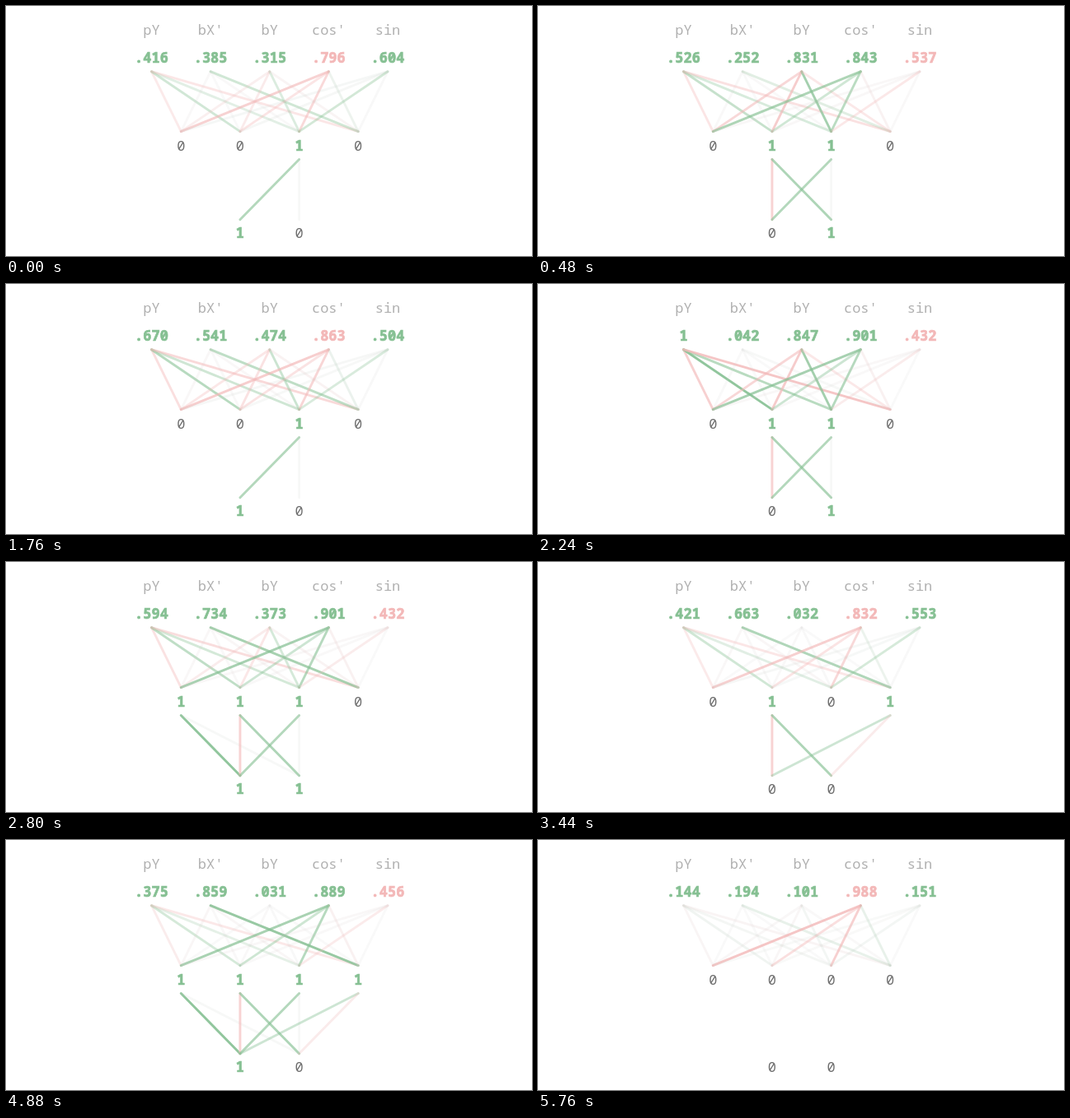
An HTML page that plays this animation: 638x304 px, repeating every 5.92 s.

```html
<!DOCTYPE html>
<html lang="en">
<head>
<meta charset="utf-8">
<title>Network activity</title>
<style>
  html, body { margin: 0; width: 100%; height: 100%; overflow: hidden; background: #fff; }
  svg { display: block; width: 638px; height: 304px; }
  text { font: 17px "Noto Sans Mono", monospace; text-anchor: middle; fill: #b0b0b0; }
  text.strong { font-weight: 700; stroke-width: .7; }
  line { stroke-width: 2.9; stroke-linecap: round; }
</style>
</head>
<body>
<svg id="stage" viewBox="0 0 638 304"></svg>
<script>
const LOOP = 5920, TICK = 80;
const GREEN = [134, 192, 147], PINK = [243, 184, 184], GRAY = [205, 203, 203], DARK = [108, 108, 108];

// Ticks on which the game pauses for one tick.
const RESTS = [8, 13, 18, 36, 40, 44, 49, 54, 60, 62, 68, 73];

// The ball crosses the court between bounces; each bounce gives a new |sin|.
const FLIGHTS = [
  { from: -5.114, sin: .6048 }, { from: 3.208, sin: .5375 }, { from: 14.284, sin: .5045 },
  { from: 24.57, sin: .4325 }, { from: 34.688, sin: .5538 }, { from: 44.53, sin: .4565 },
  { from: 53.221, sin: .1515 }, { from: 62.878, sin: 0 }
];
// Height of the ball with its wall bounces unfolded, as [step, distance].
const CLIMB = [[0, .315], [11, 1.879], [19, 2.474], [25, 3.153], [38, 4.032], [52, 5.969], [61, 6.101]];
const PADDLE = [[0, .416], [4, .645], [11, .231], [25, 1], [35, .421], [38, .421], [45, .81], [52, .375], [61, .144]];

// Rows are the inputs pY, bX', bY, cos', sin; columns the hidden units.
const INNER = {
  weights: [
    [-.75, 1, .65, -.9],
    [-.1, -.05, -.12, 1.1],
    [-.75, -.95, 1, -.4],
    [.9, .5, .75, -.22],
    [.12, .1, .65, .05]
  ],
  thresholds: [-.08, -.17, .15, .34]
};
const OUTER = {
  weights: [[1, .04], [-.7, .75], [.7, .04], [.45, -.3]],
  thresholds: [.4, .65]
};

const stage = document.getElementById("stage");
const spread = (count, offset) => Array.from({ length: count }, (_, i) => 176.5 + 71.63 * (i + offset));
const X_IN = spread(5, 0), X_HID = spread(4, .5), X_OUT = spread(2, 1.5);

function add(tag, attrs) {
  const node = document.createElementNS("http://www.w3.org/2000/svg", tag);
  for (const key in attrs) node.setAttribute(key, attrs[key]);
  return stage.appendChild(node);
}
const mesh = (from, to, y1, y2) =>
  from.map(x1 => to.map(x2 => add("line", { x1, y1, x2, y2 })));
const row = (xs, y) => xs.map(x => add("text", { x, y }));

const linesIn = mesh(X_IN, X_HID, 79.7, 152.6);
const linesOut = mesh(X_HID, X_OUT, 186.5, 259.7);
row(X_IN, 35).forEach((node, i) => node.textContent = ["pY", "bX'", "bY", "cos'", "sin"][i]);
const values = row(X_IN, 68.7);
const hiddenTexts = row(X_HID, 175.7);
const outTexts = row(X_OUT, 282.3);

function along(knots, s) {
  const i = Math.max(1, knots.findIndex(k => k[0] >= s));
  const [s0, v0] = knots[i - 1], [s1, v1] = knots[i];
  return v0 + (v1 - v0) * (s - s0) / (s1 - s0);
}

function readInputs(step) {
  const next = FLIGHTS.findIndex(f => f.from > step);
  const { from, sin } = FLIGHTS[next - 1];
  const part = (step - from) / (FLIGHTS[next].from - from);
  const leftward = next % 2 === 1;
  const climb = along(CLIMB, step);
  const rising = Math.floor(climb) % 2 === 0;
  const cos = Math.sqrt(1 - sin * sin);
  return [
    along(PADDLE, step),
    leftward ? 1 - part : part,
    rising ? climb % 1 : 1 - climb % 1,
    leftward ? -cos : cos,
    rising ? sin : -sin
  ];
}

const fire = ({ weights, thresholds }, signals) => thresholds.map((limit, j) =>
  +(signals.reduce((sum, v, i) => sum + v * weights[i][j], 0) > limit));

function format(v) {
  const n = Math.floor(Math.abs(v) * 1000 + 1e-4);
  return n >= 1000 ? "1" : "." + String(n).padStart(3, "0");
}

const rgb = c => `rgb(${c.map(Math.round)})`;

function write(node, text, color, strong) {
  node.textContent = text;
  node.style.fill = rgb(color);
  node.style.stroke = strong ? rgb(color) : "none";
  node.classList.toggle("strong", strong);
}
const writeBits = (nodes, bits) =>
  nodes.forEach((node, i) => write(node, bits[i], bits[i] ? GREEN : DARK, bits[i] === 1));

function paint(line, signal) {
  const size = Math.min(1, Math.abs(signal));
  const tint = Math.min(1, size * 3);
  const goal = signal < 0 ? PINK : GREEN;
  line.style.stroke = rgb(GRAY.map((g, i) => g + (goal[i] - g) * tint));
  line.style.strokeOpacity = .12 + .78 * size ** 1.25;
}

function paintMesh(lines, weights, signals) {
  lines.forEach((fan, i) => fan.forEach((line, j) => {
    line.style.display = signals[i] ? "" : "none";
    paint(line, signals[i] * weights[i][j]);
  }));
}

function draw(step) {
  const inputs = readInputs(step);
  const hidden = fire(INNER, inputs);
  values.forEach((node, i) => write(node, format(inputs[i]), inputs[i] < 0 ? PINK : GREEN, true));
  paintMesh(linesIn, INNER.weights, inputs);
  paintMesh(linesOut, OUTER.weights, hidden);
  writeBits(hiddenTexts, hidden);
  writeBits(outTexts, fire(OUTER, hidden));
}

const start = performance.now();
let shown = -1;
function frame() {
  const tick = Math.floor((performance.now() - start) % LOOP / TICK);
  const step = tick - RESTS.filter(r => r <= tick).length;
  if (step !== shown) draw(shown = step);
  requestAnimationFrame(frame);
}
frame();
</script>
</body>
</html>
```
